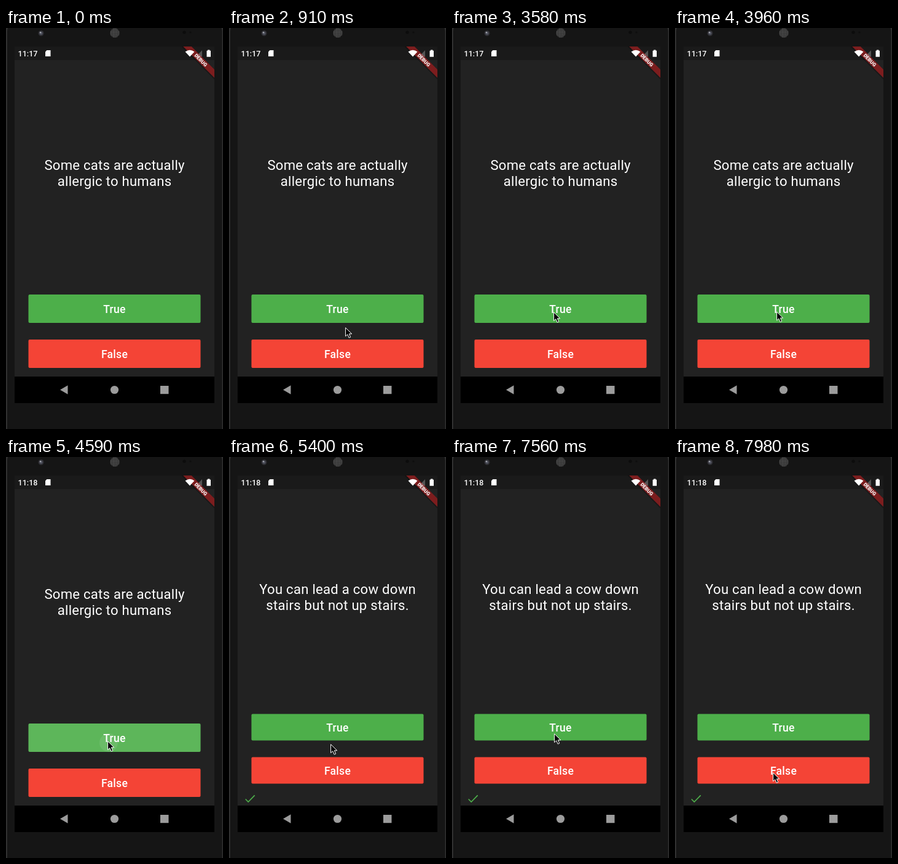
An HTML page for the animation above (8000 ms loop, 353x650 px).

```html
<!DOCTYPE html>
<html lang="en">
<head>
<meta charset="utf-8">
<title>Quiz app</title>
<style>
html, body { margin: 0; width: 100%; height: 100%; overflow: hidden; background: #151515; }
svg { display: block; width: 353px; height: 650px; font-family: Roboto, sans-serif; }
text { fill: #fff; text-anchor: middle; }
.question { font-size: 22.15px; letter-spacing: .24px; }
.button { font-size: 17.6px; font-weight: 500; letter-spacing: .25px; }
.clock { font-size: 12.6px; font-weight: 500; text-anchor: start; }
.debug { font-size: 8px; font-weight: 900; }
.yes { fill: #4daf4a; }
.no { fill: #f44436; }
.ink { fill: #fff; }

/* 8 s loop: 1% is 80 ms */
.early, .late, .first, .second, .press, .fade, .ripple, .cursor { animation: 8s step-end infinite; }
.early { animation-name: early; }
.late { animation-name: late; }
.first { animation-name: first; }
.second { animation-name: second; }
.press { animation-name: press; }
.fade { animation-name: fade; }
.ripple { animation-name: ripple; }
.cursor { animation-name: move; }
@keyframes early { 0% { visibility: visible } 55.125%, 100% { visibility: hidden } }
@keyframes late { 0% { visibility: hidden } 55.125%, 100% { visibility: visible } }
@keyframes first { 0% { visibility: visible } 58.125%, 100% { visibility: hidden } }
@keyframes second { 0% { visibility: hidden } 58.125%, 100% { visibility: visible } }
@keyframes press { 0% { opacity: 0 } 57.375% { opacity: 1 } 58.125%, 100% { opacity: 0 } }
@keyframes fade { 0% { opacity: 0 } 58.125% { opacity: .8 } 59.25% { opacity: .4 } 60.375%, 100% { opacity: 0 } }
@keyframes ripple { 0% { r: 42px } 59.25%, 100% { r: 95px } }
@keyframes move {
  0% { transform: translate(219px, 700px) }
  4% { transform: translate(219px, 636px); animation-timing-function: ease-out }
  8.375% { transform: translate(190px, 482px) }
  11.375% { transform: translate(189px, 485px); animation-timing-function: ease-in-out }
  13.5% { transform: translate(154px, 533px); animation-timing-function: ease-in-out }
  15.5% { transform: translate(162px, 461px) }
  18.875% { transform: translate(162px, 460px) }
  44.75% { transform: translate(165px, 460px); animation-timing-function: ease-in-out }
  47.25% { transform: translate(200px, 478px); animation-timing-function: ease-in-out }
  49% { transform: translate(165px, 457px); animation-timing-function: ease-out }
  49.875% { transform: translate(165px, 460px) }
  67.5% { transform: translate(165px, 465px); animation-timing-function: ease-in-out }
  70.5% { transform: translate(150px, 519px); animation-timing-function: ease-in-out }
  74.625% { transform: translate(166px, 445px) }
  94.5% { transform: translate(166px, 448px); animation-timing-function: ease-in-out }
  97.5% { transform: translate(160px, 533px); animation-timing-function: ease-out }
  99.75%, 100% { transform: translate(159px, 511px) }
}
</style>
</head>
<body>
<svg viewBox="0 0 353 650">
  <defs>
    <pattern id="mesh" width="2.6" height="2.6" patternUnits="userSpaceOnUse">
      <circle cx="1.3" cy="1.3" r=".8" fill="#777"/>
    </pattern>
    <clipPath id="screen"><path d="M14 30H339V608H14Z"/></clipPath>
    <clipPath id="answer"><rect x="36.5" y="416.5" width="280" height="43" rx="2"/></clipPath>
  </defs>

  <!-- phone body -->
  <rect width="353" height="650" fill="#303030"/>
  <rect x="2" y="-12" width="349.5" height="700" rx="18" fill="#151515"/>
  <circle cx="57" cy="8.5" r="4.5" fill="#303035"/>
  <circle cx="57" cy="8.5" r="2.5" fill="#50535f"/>
  <circle cx="56" cy="7.3" r="1.2" fill="#a5a8b0"/>
  <circle cx="177" cy="8" r="7.8" fill="#242424"/>
  <circle cx="177" cy="8" r="7.6" fill="url(#mesh)"/>
  <circle cx="290" cy="7" r="2.6" fill="#0c0c0c"/>
  <circle cx="300" cy="7" r="1.6" fill="#0e0e0e"/>

  <!-- screen -->
  <g clip-path="url(#screen)">
    <path d="M14 30H339V608H14Z" fill="#222"/>
    <path d="M14 30H339V52H14Z" fill="#1a1a1a"/>
    <path d="M14 565H339V608H14Z" fill="#000"/>
    <g transform="translate(317 52) rotate(45)">
      <rect x="-60" y="-4.8" width="120" height="11.5" fill="#000" opacity=".3"/>
      <rect x="-60" y="-4.8" width="120" height="9.6" fill="#7c1d1e"/>
      <text class="debug" y="2.9">DEBUG</text>
    </g>
  </g>
  <g fill="#fff">
    <path d="M66.5 36H72.5V46H64V38.5Z"/>
    <path d="M291.5 38.4Q299 33 306.500 38.4L299 46.500Z"/>
    <path d="M319 36V46.500H309Z" opacity=".25"/>
    <path d="M328 35.500H331.500V36.800H333V46.800H326.500V36.800H328Z"/>
  </g>
  <text class="clock early" x="19.500" y="46">11:17</text>
  <text class="clock late" x="19.500" y="46">11:18</text>
  <g fill="#9c9c9c">
    <path d="M88 586.500L100.500 579.300V593.700Z"/>
    <circle cx="176.500" cy="586.500" r="6.600"/>
    <rect x="251" y="580" width="13.500" height="13.200"/>
  </g>

  <g class="first">
    <text class="question" x="176.600" y="230">Some cats are actually</text>
    <text class="question" x="176.600" y="256">allergic to humans</text>
    <rect class="yes" x="36.500" y="432" width="280" height="46" rx="2"/>
    <g class="press ink">
      <rect x="36.500" y="432" width="280" height="46" rx="2" opacity=".09"/>
      <circle cx="167" cy="463" r="15" opacity=".09"/>
    </g>
    <text class="button" x="176.500" y="461.500">True</text>
    <rect class="no" x="36.500" y="505" width="280" height="46" rx="2"/>
    <text class="button" x="176.500" y="535">False</text>
  </g>

  <g class="second">
    <text class="question" x="176.600" y="222">You can lead a cow down</text>
    <text class="question" x="176.600" y="248">stairs but not up stairs.</text>
    <rect class="yes" x="36.500" y="416.500" width="280" height="43" rx="2"/>
    <g class="fade ink" clip-path="url(#answer)">
      <rect x="36.500" y="416.500" width="280" height="43" opacity=".09"/>
      <circle class="ripple" cx="170" cy="450" r="42" opacity=".09"/>
    </g>
    <text class="button" x="176.500" y="444.500">True</text>
    <rect class="no" x="36.500" y="486.500" width="280" height="43" rx="2"/>
    <text class="button" x="176.500" y="514.700">False</text>
    <path d="M26.800 554.500L31.300 559L41.800 548.300" fill="none" stroke="#4daf4a" stroke-width="1.700"/>
  </g>

  <g class="cursor">
    <path d="M.6 .8V14.600L3.800 11.700 6.200 17.200 8.700 16.100 6.400 10.800H10.800Z" fill="#000" stroke="#fff"/>
  </g>
</svg>
</body>
</html>
```
